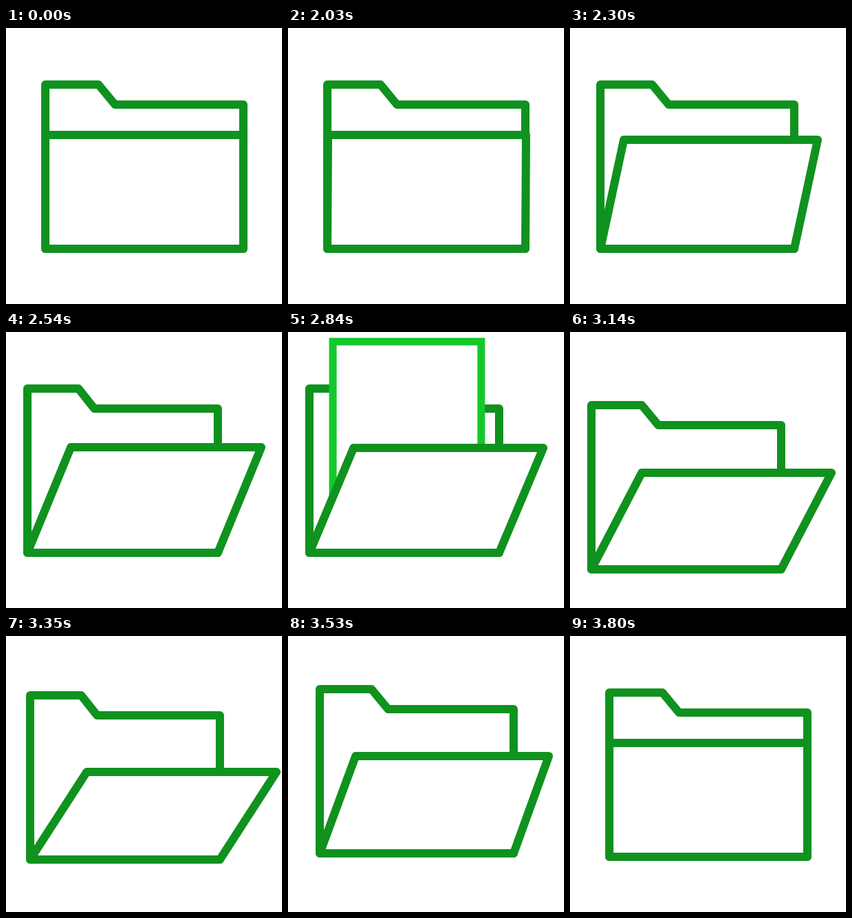
Write an HTML page with a canvas that moves like this. It is 400 px wide and 400 px high and loops after 3.83 s.

```html
<!DOCTYPE html>
<html>
<head>
<meta charset="utf-8">
<style>
html, body { margin: 0; width: 100%; height: 100%; overflow: hidden; background: #fff; }
canvas { display: block; width: 400px; height: 400px; }
</style>
</head>
<body>
<canvas id="stage" width="400" height="400"></canvas>
<script>
const ctx = document.getElementById('stage').getContext('2d');
const LOOP = 3830, HOLD = 2030, STEP = 30;
const GREEN = '#10921f', LIME = '#14c82c';

// Sine ease in and out, 0 before start and 1 after end
function ease(t, start, end) {
  const p = Math.min(1, Math.max(0, (t - start) / (end - start)));
  return (1 - Math.cos(Math.PI * p)) / 2;
}

// Whole-pixel corners keep the straight edges crisp
function outline(points, color, width, join) {
  ctx.beginPath();
  for (const [x, y] of points) ctx.lineTo(Math.round(x), Math.round(y));
  ctx.closePath();
  ctx.fillStyle = '#fff';
  ctx.strokeStyle = color;
  ctx.lineWidth = width;
  ctx.lineJoin = join;
  ctx.fill();
  ctx.stroke();
}

function draw(t) {
  const slide = ease(t, 2000, 2600);
  const open = ease(t, 1970, 2600);
  const spread = ease(t, 2910, 3370);
  const shut = ease(t, 3370, 3750);

  const left = 57 - 26.5 * (slide - ease(t, 3185, 3800));
  const right = 344 - 38 * (slide - ease(t, 3230, 3800));
  const width = right - left;

  // The landing sheet pushes the folder down; it springs back a little too far
  const drop = 24.2 * ease(t, 2840, 3120) - 29.2 * ease(t, 3120, 3487) + 5 * ease(t, 3487, 3800);
  const bottom = 320 + drop;

  const lean = 64 * open + 18.5 * spread - 82.5 * shut;
  const top = bottom - 165 + 12.5 * open + 25.5 * spread - 38 * shut;
  const base = [[right, bottom], [left, bottom]];

  ctx.clearRect(0, 0, 400, 400);
  outline([
    [left, bottom - 238], [left + width * 0.268, bottom - 238],
    [left + width * 0.3525, bottom - 209], [right, bottom - 209],
    ...base
  ], GREEN, 12, 'round');

  // The sheet falls in behind the cover and never shows below it
  const sheet = -310 + 649 * ease(t, 2540, 3140);
  ctx.save();
  ctx.beginPath();
  ctx.rect(0, 0, 400, bottom);
  ctx.clip();
  outline([[65, sheet], [280, sheet], [280, sheet + 290], [65, sheet + 290]], LIME, 11, 'miter');
  ctx.restore();

  outline([[left + lean, top], [right + lean, top], ...base], GREEN, 12, 'round');
}

const origin = performance.now();
function frame() {
  const t = (performance.now() - origin) % LOOP;
  draw(t < HOLD ? 0 : HOLD + Math.floor((t - HOLD) / STEP) * STEP);
  requestAnimationFrame(frame);
}
frame();
</script>
</body>
</html>
```
